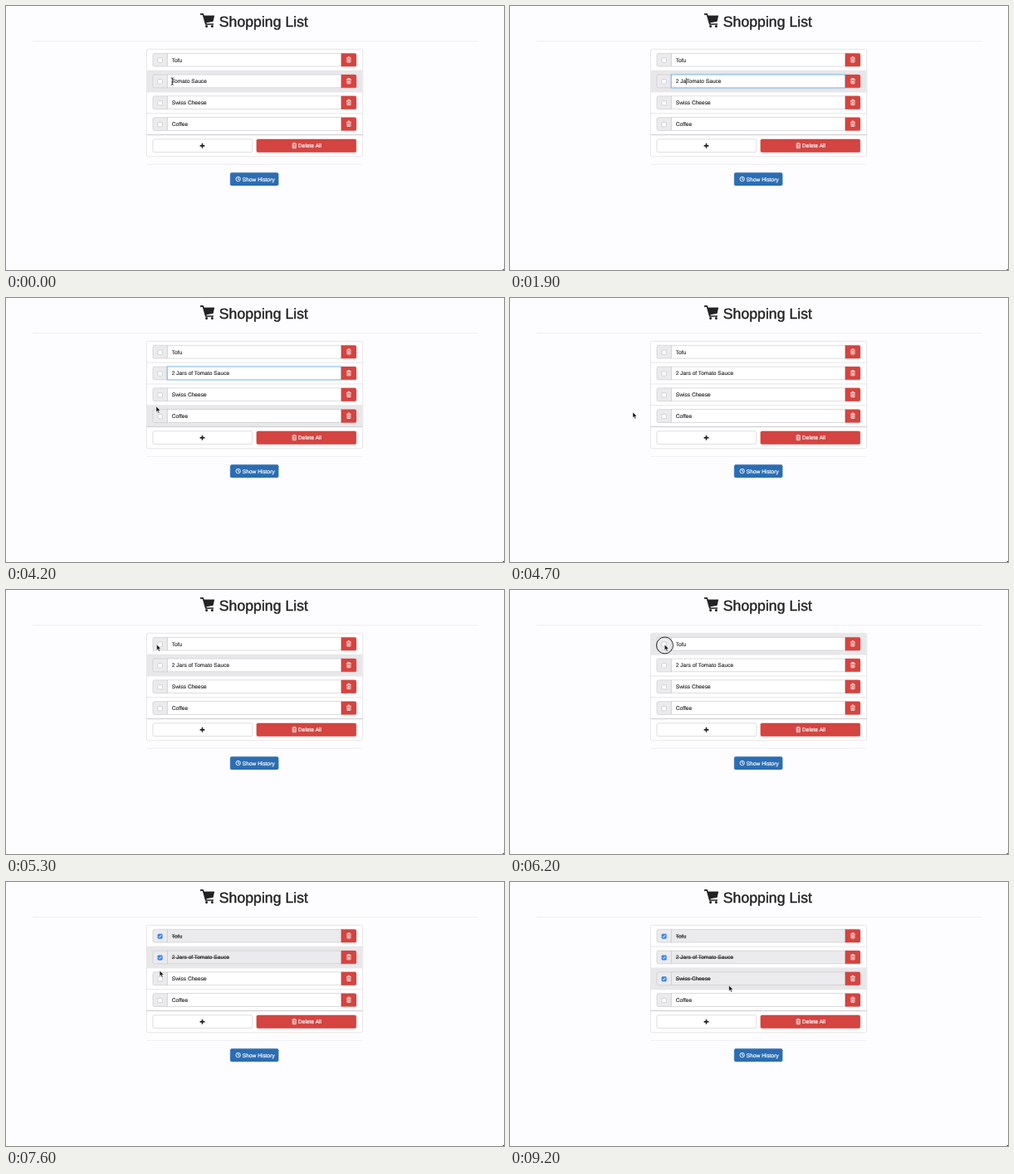
These frames come from a looping animation (600x319 px, 9300 ms). An HTML page:

```html
<!DOCTYPE html>
<html lang="en">
<head>
<meta charset="utf-8">
<title>Shopping List</title>
<style>
  html, body { margin: 0; width: 100%; height: 100%; overflow: hidden; background: #fdfcfe; }
  svg { display: block; width: 600px; height: 319px; }
  text { font: 6.62px "Liberation Sans", Arial, sans-serif; fill: #222; stroke: #222; stroke-width: .12px; white-space: pre; text-rendering: geometricPrecision; }
  .title { font-size: 17.7px; stroke-width: .4px; }
  .light { fill: #fff; stroke: #fff; stroke-width: .2px; }
  .danger { fill: #d44440; stroke: #d2413d; stroke-width: .4; }
  .field { stroke: #c6c6c8; stroke-width: .6; }
  .rule { stroke: #dcdcde; stroke-width: .7; }
  .faint { stroke: #eeedef; stroke-width: .8; }
  .hover { fill: #e8e7e9; }
  .row .input { fill: #fff; }
  .row .tick, .row .strike { visibility: hidden; }
  .row .box { fill: #fff; stroke: #b9b9bb; stroke-width: .6; }
  .done .input { fill: #ebeaec; }
  .done .box { fill: #3b87ee; stroke: #2f78dd; }
  .done .tick, .done .strike { visibility: visible; }
  .focus .input { stroke: #72b4ea; stroke-width: .8; filter: drop-shadow(0 0 .8px #66afe988); }
</style>
</head>
<body>
<svg viewBox="0 0 600 319">
  <defs>
    <g id="trash" fill="none" stroke="#fff" stroke-width=".75">
      <path d="M-2.7-2.3H2.7M-1-2.4V-3.4H1V-2.4M-2-2V3H2V-2M-.7-1.1V2.2M.7-1.1V2.2"/>
    </g>
  </defs>
  <rect width="600" height="319" fill="#fdfcfe"/>
  <path d="M600 317.4V319H598.2Z" fill="#333"/>

  <g fill="#222">
    <path d="M234 9H237.8L238.7 11.5H251.2L249.6 18.7L241.4 20.2L241.7 21.2H250V22.7H240.1L236.8 10.8H234Z"/>
    <circle cx="241.6" cy="24.5" r="1.5"/>
    <circle cx="248.4" cy="24.5" r="1.5"/>
  </g>
  <text class="title" x="256.8" y="25.4">Shopping List</text>
  <path class="faint" d="M32 42.5H568"/>

  <rect class="rule" x="169.4" y="52.3" width="260.4" height="129.5" rx="2" fill="#fff"/>
  <rect id="hover" class="hover" x="169.8" width="259.6" height="25.4"/>
  <path class="rule" d="M169.4 78.1H429.8M169.4 103.9H429.8M169.4 129.8H429.8"/>
  <path d="M169.4 155.7H429.8" stroke="#d2d1d3" stroke-width="1.2"/>
  <g id="rows"></g>

  <rect class="field" x="176.9" y="160.9" width="120" height="15.8" rx="2" fill="#fff"/>
  <path d="M236.5 166V171.8M233.6 168.9H239.4" stroke="#222" stroke-width="1.6"/>
  <rect class="danger" x="301.9" y="160.9" width="120" height="15.8" rx="1.6"/>
  <use href="#trash" x="347.3" y="168.8"/>
  <text class="light" x="352.1" y="171.2">Delete All</text>

  <path class="faint" d="M169.4 191.5H429.8"/>
  <rect x="270.2" y="201.4" width="58" height="15.6" rx="1.8" fill="#2b6db3" stroke="#2866a9" stroke-width=".4"/>
  <g fill="none" stroke="#fff" stroke-width=".9">
    <circle cx="279.7" cy="209.1" r="2.7"/>
    <path d="M279.7 207.3V209.3H281.2"/>
  </g>
  <text class="light" x="284.8" y="211.6">Show History</text>

  <path id="caret" d="M0 86.8V95" stroke="#111" stroke-width=".7"/>
  <g id="pointer">
    <circle id="ring" cx=".2" cy=".9" r="10" fill="none" stroke="#111" stroke-width=".9"/>
    <path id="beam" d="M-1.6-4.3Q0-4.3 0-3.2Q0-4.3 1.6-4.3M0-3.4V3.4M-1.6 4.3Q0 4.3 0 3.2Q0 4.3 1.6 4.3M-.8.9H.8" fill="none" stroke="#111" stroke-width=".8"/>
    <path id="arrow" d="M0 0V6.7L1.5 5.3L2.6 7.9L3.8 7.4L2.7 4.9H4.8Z" fill="#111" stroke="#fff" stroke-width=".4"/>
  </g>
</svg>
<script>
  const LOOP = 9300, STEP = 100;
  const TOP = 52.3, PITCH = 25.83, LEFT = 169.4;
  const PREFIX = '2 Jars of ', TYPE_START = 1000, KEY_GAP = 225;
  const PRESS = 200, HOVER_LAG = 200;
  const FOCUS = 400, BLUR = 4500, CHECKS = [6200, 7000, 8200];
  const HIDE = 1100, REAPPEAR = 4100;
  const HOME = [200.3, 91];
  // Pointer glides: start, end, x, y
  const GLIDES = [
    [3900, 4000, 181, 131], [4200, 4500, 148, 138], [4700, 5300, 181.6, 66],
    [5500, 6000, 186.3, 66], [6400, 6800, 185.5, 92], [7200, 7900, 185, 117],
    [8400, 9200, 263.8, 125]
  ];

  const $ = id => document.getElementById(id);
  const show = (el, on) => el.setAttribute('visibility', on ? 'visible' : 'hidden');
  const clamp = (v, lo, hi) => Math.min(hi, Math.max(lo, v));
  const smooth = k => k * k * (3 - 2 * k);

  $('rows').innerHTML = ['Tofu', 'Tomato Sauce', 'Swiss Cheese', 'Coffee'].map((name, i) => `
    <g class="row" transform="translate(0 ${i * PITCH})">
      <path class="field" d="M194.3 57.2H178.9Q176.9 57.2 176.9 59.2V71Q176.9 73 178.9 73H194.3Z" fill="#ebeaec"/>
      <rect class="field input" x="194.3" y="57.2" width="209.6" height="15.8"/>
      <path class="danger" d="M404 57.2H420.4Q422 57.2 422 58.8V71.4Q422 73 420.4 73H404Z"/>
      <use href="#trash" x="413" y="65"/>
      <rect class="box" x="182.9" y="62.9" width="5.4" height="5.4" rx="1"/>
      <path class="tick" d="M184.1 65.7L185.2 66.9L187.2 64.1" fill="none" stroke="#fff" stroke-width=".9"/>
      <text x="199.8" y="67.5">${name}</text>
      <path class="strike" stroke="#222" stroke-width=".6"/>
    </g>`).join('');

  const rows = [...document.querySelectorAll('.row')];
  const labels = rows.map(r => r.querySelector('text'));
  const strikes = rows.map(r => r.querySelector('.strike'));

  function pointerAt(t) {
    let [x, y] = HOME;
    for (const [from, to, toX, toY] of GLIDES) {
      const k = smooth(clamp((t - from) / (to - from), 0, 1));
      x += (toX - x) * k;
      y += (toY - y) * k;
    }
    return [x, y];
  }

  // The highlighted row trails the pointer a little
  function drawHover(t) {
    const [x, y] = pointerAt(t - HOVER_LAG);
    show($('hover'), x > LEFT);
    $('hover').setAttribute('y', TOP + .2 + Math.floor((y - TOP) / PITCH) * PITCH);
  }

  function drawRows(t, focused) {
    rows.forEach((row, i) => {
      const done = t >= CHECKS[i] + PRESS;
      row.classList.toggle('done', done);
      row.classList.toggle('focus', i === 1 && focused);
      if (done) strikes[i].setAttribute('d', `M199.8 65.4h${labels[i].getComputedTextLength()}`);
    });
  }

  function drawTyping(t, focused) {
    const typed = clamp(Math.floor((t - TYPE_START) / KEY_GAP), 0, PREFIX.length);
    labels[1].textContent = PREFIX.slice(0, typed) + 'Tomato Sauce';
    const lastKey = typed ? TYPE_START + typed * KEY_GAP : FOCUS;
    const dx = typed ? labels[1].getSubStringLength(0, typed) : 0;
    show($('caret'), focused && (t - lastKey) % 1000 < 500);
    $('caret').setAttribute('transform', `translate(${199.9 + dx} 0)`);
  }

  function drawPointer(t) {
    const pressed = [FOCUS, BLUR, ...CHECKS].some(c => t >= c && t < c + PRESS);
    $('pointer').setAttribute('transform', `translate(${pointerAt(t)})`);
    show($('ring'), pressed);
    show($('beam'), t < HIDE);
    show($('arrow'), t >= REAPPEAR);
  }

  function render(t) {
    const focused = t > FOCUS && t <= BLUR;
    drawTyping(t, focused);
    drawRows(t, focused);
    drawHover(t);
    drawPointer(t);
  }

  const start = performance.now();
  let shown = -1;
  function tick() {
    const t = Math.floor(((performance.now() - start) % LOOP) / STEP) * STEP;
    if (t !== shown) render(shown = t);
    requestAnimationFrame(tick);
  }
  tick();
</script>
</body>
</html>
```
